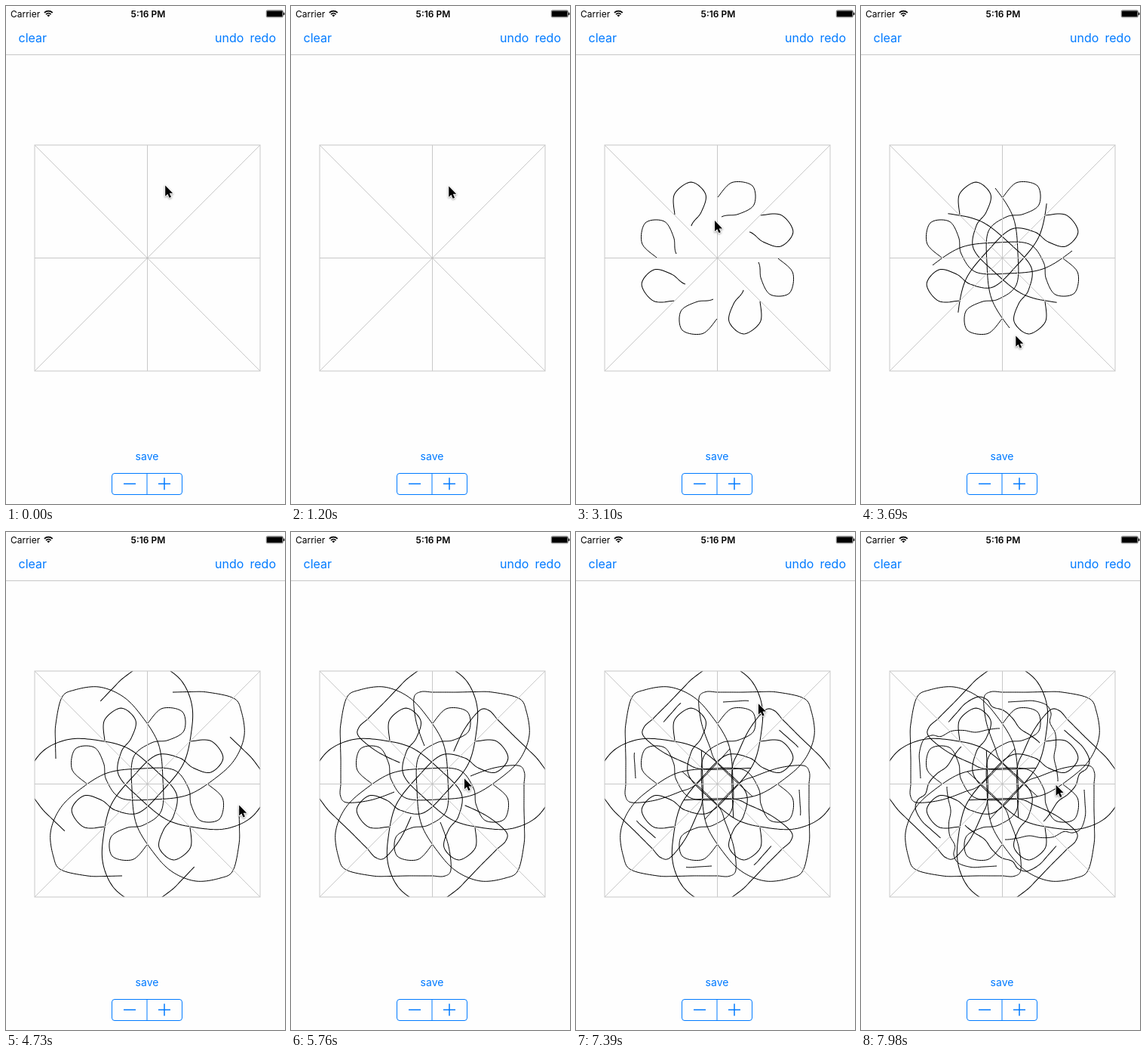
These frames come from a looping animation (370 by 659 pixels, 8000 ms). An HTML page with a canvas:

```html
<!DOCTYPE html>
<html lang="en">
<head>
<meta charset="utf-8">
<title>Kaleidoscope drawing</title>
<style>
  html, body { margin: 0; width: 100%; height: 100%; overflow: hidden; background: #fefefe; }
  canvas { display: block; width: 370px; height: 659px; }
</style>
</head>
<body>
<canvas id="stage"></canvas>
<script>
const W = 370, H = 659, LOOP = 8000;
const FIRST = 1184, TICK = 147.4;      // the screen refreshes once per tick
const CX = 187.5, CY = 333.5, HALF = 149.5, FOLDS = 8;
const PAPER = '#fefefe', BLUE = '#007aff', GRID = '#c8c8c8';
const LEAD = 0.35;                     // ticks by which the pointer runs ahead of the ink

const canvas = document.getElementById('stage');
const ctx = canvas.getContext('2d');
const dpr = window.devicePixelRatio || 1;
canvas.width = W * dpr;
canvas.height = H * dpr;

// Pointer moves: start tick, points passed per tick, and the smooth route.
const approach = { start: -1, rate: 1 / 8, points: [[211, 237], [188, 249]] };
const petals = {
  start: 8, rate: 1,
  points: [
    [188, 253], [207, 233.5], [234, 238], [236, 263], [215, 275.5], [193, 279],
    [169, 298], [167, 340], [173, 387], [197, 426], [221, 450], [252, 462],
    [284, 458], [301, 448], [309, 413], [309.5, 390], [309, 367], [309, 351],
    [309, 335], [309, 333], [309.5, 318], [301, 309], [270, 312], [238, 323],
    [214, 334.5], [171, 380]
  ]
};
const detour = {
  start: 35 + LEAD, rate: 1,
  points: [[171, 380], [172, 300], [178.5, 197.5], [190, 129], [192, 165], [195, 225]]
};
const waves = {
  start: 41, rate: 2,
  points: [
    [195, 225], [212, 224], [229, 223.5], [246, 229], [252, 240], [250.5, 252],
    [257.5, 266], [258.5, 282], [256, 298], [259.5, 315], [261, 330], [257.5, 335]
  ]
};
const moves = [approach, petals, detour, waves];

// How far along its route a move is, as a fractional point index.
function progress(move, tick) {
  const u = (tick - move.start) * move.rate;
  return Math.max(0, Math.min(move.points.length - 1, u));
}

// Catmull-Rom position at fractional index u.
function along(points, u) {
  const last = points.length - 1;
  const i = Math.min(Math.floor(u), last - 1), f = u - i;
  const at = n => points[Math.max(0, Math.min(last, n))];
  const [p, q, r, s] = [at(i - 1), at(i), at(i + 1), at(i + 2)];
  return [0, 1].map(k => q[k] + 0.5 * f * (r[k] - p[k] +
    f * (2 * p[k] - 5 * q[k] + 4 * r[k] - s[k] + f * (3 * (q[k] - r[k]) + s[k] - p[k]))));
}

function inkPath(move, tick) {
  const path = new Path2D();
  const end = progress(move, tick);
  const steps = Math.ceil(end * 10);
  for (let i = 0; i <= steps && steps; i++) {
    const [x, y] = along(move.points, end * i / steps);
    path.lineTo(x - CX, y - CY);
  }
  return path;
}

function pointerAt(tick) {
  const t = tick + LEAD;
  const move = moves.filter(m => m.start <= t).pop() || approach;
  const ahead = move === approach ? tick : t;
  return along(move.points, progress(move, ahead));
}

function line(x1, y1, x2, y2) {
  ctx.beginPath();
  ctx.moveTo(x1, y1);
  ctx.lineTo(x2, y2);
  ctx.stroke();
}

function text(str, x, y, size, color, weight = 400, align = 'left') {
  ctx.font = `${weight} ${size}px Inter, "Liberation Sans", sans-serif`;
  ctx.fillStyle = color;
  ctx.textAlign = align;
  ctx.fillText(str, x, y);
}

function box(x, y, w, h, r) {
  ctx.beginPath();
  ctx.roundRect(x, y, w, h, r);
}

function drawStatusBar() {
  text('Carrier', 6, 14.5, 12, '#000');
  text('5:16 PM', 188.5, 14.5, 12, '#000', 600, 'center');

  ctx.strokeStyle = ctx.fillStyle = '#000';
  ctx.lineWidth = 1.7;
  const fan = r => ctx.arc(56.3, 14.3, r, -Math.PI * 0.75, -Math.PI * 0.25);
  for (const r of [4.6, 7.6]) {
    ctx.beginPath();
    fan(r);
    ctx.stroke();
  }
  ctx.beginPath();
  ctx.moveTo(56.3, 14.3);
  fan(2.7);
  ctx.fill();

  ctx.lineWidth = 0.6;
  box(345.3, 5.8, 22, 9, 1.5);
  ctx.stroke();
  box(346, 6.5, 20.6, 7.6, 0.8);
  ctx.fill();
  box(368, 8.6, 1.3, 3.4, 0.6);
  ctx.fill();
}

function drawControls() {
  text('clear', 16.5, 48, 16, BLUE);
  text('undo', 277, 48, 16, BLUE);
  text('redo', 323.5, 48, 16, BLUE);
  text('save', 187, 600.5, 14, BLUE, 400, 'center');

  ctx.lineWidth = 1;
  ctx.strokeStyle = GRID;
  line(0, 64.5, W, 64.5);

  ctx.strokeStyle = BLUE;
  box(140.5, 618.5, 93, 28, 3.5);
  ctx.stroke();
  line(187, 618.5, 187, 646.5);
  ctx.lineWidth = 1.5;
  line(156, 632.3, 172, 632.3);
  line(202, 632.3, 218, 632.3);
  line(210, 624.3, 210, 640.3);
}

function drawArt(tick) {
  ctx.save();
  ctx.translate(CX, CY);
  ctx.lineWidth = 1;

  ctx.save();
  ctx.beginPath();
  ctx.rect(-HALF, -HALF, HALF * 2, HALF * 2);
  ctx.clip();
  ctx.strokeStyle = '#000';
  ctx.lineJoin = 'round';
  const paths = [petals, waves].map(m => inkPath(m, tick));
  for (let i = 0; i < FOLDS; i++) {
    paths.forEach(p => ctx.stroke(p));
    ctx.rotate(2 * Math.PI / FOLDS);
  }
  ctx.restore();

  ctx.strokeStyle = GRID;
  ctx.strokeRect(-HALF, -HALF, HALF * 2, HALF * 2);
  for (const [dx, dy] of [[0, 1], [1, 0], [1, 1], [1, -1]]) {
    line(-dx * HALF, -dy * HALF, dx * HALF, dy * HALF);
  }
  ctx.restore();
}

function drawPointer([x, y]) {
  const arrow = new Path2D('M0 0V14.2L3.2 11.2L5.4 16.2L7.8 15.2L5.6 10.3H10Z');
  ctx.save();
  ctx.translate(x + 0.2, y + 0.5);
  ctx.lineJoin = 'round';
  ctx.lineWidth = 1.8;
  ctx.strokeStyle = '#fff';
  ctx.shadowColor = 'rgba(0,0,0,0.4)';
  ctx.shadowBlur = 2.5 * dpr;
  ctx.shadowOffsetY = dpr;
  ctx.stroke(arrow);
  ctx.shadowColor = 'transparent';
  ctx.fillStyle = '#000';
  ctx.fill(arrow);
  ctx.restore();
}

function render(ms) {
  const tick = Math.floor((ms - FIRST) / TICK);
  ctx.setTransform(dpr, 0, 0, dpr, 0, 0);
  ctx.fillStyle = PAPER;
  ctx.fillRect(0, 0, W, H);
  drawStatusBar();
  drawControls();
  drawArt(tick);
  drawPointer(pointerAt(tick));
}

const start = performance.now();
function loop() {
  render((performance.now() - start) % LOOP);
  requestAnimationFrame(loop);
}
loop();
</script>
</body>
</html>
```
